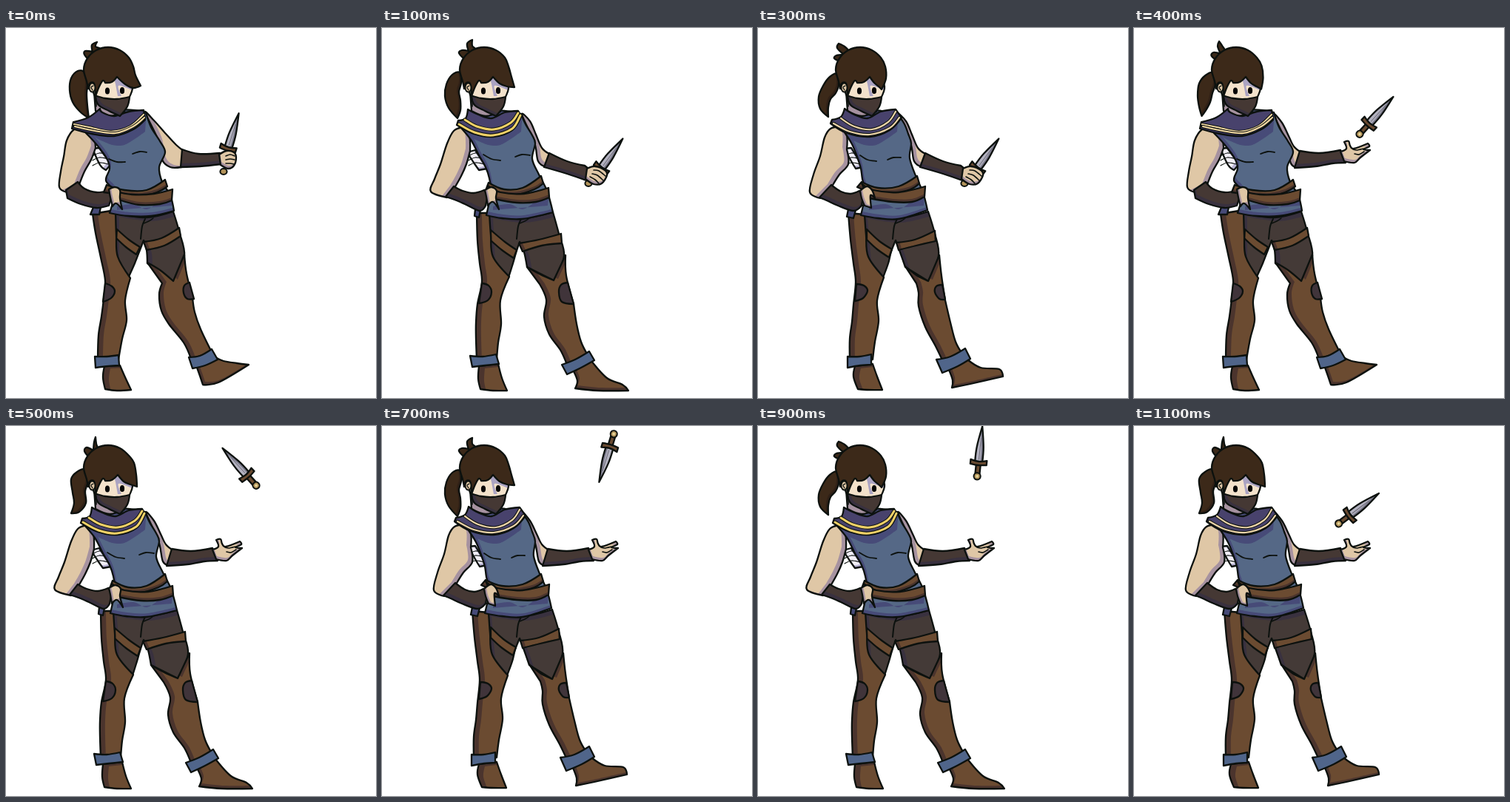
These frames come from a looping animation (500 by 500 pixels, 1200 ms). An HTML page with a canvas:

```html
<!DOCTYPE html>
<html lang="en">
<head>
<meta charset="utf-8">
<title>Dagger toss</title>
<style>
  html, body { margin: 0; width: 100%; height: 100%; overflow: hidden; background: #fff; }
  canvas { display: block; width: 500px; height: 500px; }
</style>
</head>
<body>
<canvas id="stage" width="500" height="500"></canvas>
<script>
const ctx = document.getElementById('stage').getContext('2d');
const STEP = 100, STEPS = 12;
const INK = '#0c110e', SKIN = '#dfc7a6', SKIN_DARK = '#a692a0', HAIR = '#3c2919';
const LEATHER = '#6b4b31', LEATHER_DARK = '#4b342d', CLOTH = '#443a37', CLOTH_DARK = '#39313f';
const BLUE = '#556886', BLUE_DARK = '#474b78', PURPLE = '#48426c', GLOVE = '#453834';

// "x y, x y*, ..." : a star marks a sharp corner
const parse = text => text.split(',').map(p => {
  const [x, y] = p.trim().split(' ').map(parseFloat);
  return { x, y, sharp: p.includes('*') };
});

// Picks a shape from a list; a fractional key blends two neighbours
function at(list, key) {
  const a = parse(list[Math.floor(key)]), k = key % 1;
  if (!k) return a;
  const b = parse(list[Math.ceil(key)]);
  return a.map((p, i) => ({ x: p.x + (b[i].x - p.x) * k, y: p.y + (b[i].y - p.y) * k, sharp: p.sharp }));
}

function outline(points, closed = true) {
  const path = new Path2D(), n = points.length;
  const get = i => closed ? points[(i + n) % n] : points[Math.max(0, Math.min(n - 1, i))];
  const slope = i => {
    if (get(i).sharp) return [0, 0];
    const a = get(i - 1), b = get(i + 1);
    return [(b.x - a.x) / 6, (b.y - a.y) / 6];
  };
  path.moveTo(points[0].x, points[0].y);
  for (let i = 0; i < (closed ? n : n - 1); i++) {
    const p = get(i), q = get(i + 1), s = slope(i), e = slope(i + 1);
    path.bezierCurveTo(p.x + s[0], p.y + s[1], q.x - e[0], q.y - e[1], q.x, q.y);
  }
  if (closed) path.closePath();
  return path;
}

// Fills a shape; when shaded, the lit copy is shifted inside the dark one
function shape(points, fill, dark, dx = 0, dy = 0, extra) {
  const path = outline(points);
  ctx.fillStyle = dark || fill;
  ctx.fill(path);
  ctx.save();
  ctx.clip(path);
  if (dark) {
    ctx.translate(dx, dy);
    ctx.fillStyle = fill;
    ctx.fill(path);
    ctx.translate(-dx, -dy);
  }
  if (extra) extra();
  ctx.restore();
  ink(path);
}
function ink(path, width = 2.3, color = INK) {
  ctx.strokeStyle = color;
  ctx.lineWidth = width;
  ctx.stroke(path);
}
const line = (text, width, color) => ink(outline(parse(text), false), width, color);
function patch(text, fill) {
  ctx.fillStyle = fill;
  ctx.fill(outline(parse(text)));
}
function oval(x, y, rx, ry, fill, width) {
  const path = new Path2D();
  path.ellipse(x, y, rx, ry, 0, 0, 7);
  ctx.fillStyle = fill;
  ctx.fill(path);
  if (width) ink(path, width);
}

// Three poses each: toe raised, toe down, toe rising
const body = {
  trousers: [
    '146 250*,190 256,226 248*,234 275,241 308,226 342*,191 318*,190 300,186 287*,181 300,174 318,165 338*,146 310*',
    '143 252*,186 258,231 249*,239 278,246 308,232 341*,196 323*,192 303,186 289*,181 304,177 318,171 337*,146 310*',
    '141 252*,186 258,230 248*,239 278,244 308,230 342*,199 323*,192 303,186 287*,180 302,176 318,169 337*,146 310*'],
  strapL: [
    '150 272*,166 286,181 296*,176 306*,162 296,149 284*',
    '147 273*,166 289,182 300*,178 311*,162 300,147 287*',
    '147 272*,164 288,181 299*,177 310*,161 299,147 286*'],
  strapR: [
    '186 289*,210 284,234 270*,236 281*,214 294,190 300*',
    '185 291*,212 286,242 278*,243 291*,216 294,190 302*',
    '187 290*,212 286,239 274*,240 288*,214 294,190 300*'],
  legL: [
    '117 251*,121 277,128 310,134 341,132 366,129 390,125 415,124 448*,152 448*,157 420,163 395,161 368,168 338*,151 309,149 280,148 246*',
    '128 250*,129 287,132 318,135 343,129 373,127 398,127 420,128 448*,155 448*,157 425,161 400,160 368,172 336*,150 309,147 280,145 250*',
    '122 250*,125 286,129 318,132 343,129 374,127 397,124 420,124 448*,155 448*,158 424,163 396,161 368,170 337*,149 309,146 280,144 252*'],
  kneeL: [
    '134 345*,143 349,147 356,142 365,131 370*',
    '135 345*,144 348,148 357,143 368,131 372*',
    '133 346*,143 348,148 355,142 365,131 369*'],
  bootR: [
    '191 317*,208 327,226 342*,241 306*,244 332,252 364*,255 384,263 407,278 438*,250 447*,240 425,220 400,210 382,207 360,211 345*',
    '196 323*,214 333,232 341*,248 307*,249 335,259 373*,263 400,269 424,278 442*,250 455*,241 435,226 414,219 390,222 367,213 346*',
    '199 322*,214 334,230 342*,245 307*,248 335,253 368*,260 398,267 424,276 440*,251 453*,240 430,226 404,217 376,217 358,214 345*'],
  kneeR: [
    '248 344*,241 348,240 358,245 366,254 366*',
    '251 344*,242 347,239 357,243 370,259 373*',
    '249 347*,241 349,239 357,245 366,253 367*'],
  footL: [
    '133 457*,131 472,134 488*,150 490,169 489*,161 472,154 456*',
    '131 457*,130 474,133 488*,150 490,169 490*,162 473,157 454*',
    '131 457*,129 471,135 488*,150 489,168 489*,161 471,155 454*'],
  footR: [
    '257 456*,262 470,266 482*,287 479,328 455*,312 453,294 450,283 445*',
    '259 464*,264 477,261 487*,292 490,333 490*,325 482,304 473,283 450*',
    '258 462*,263 476,262 486*,287 481,331 471*,326 461,301 459,283 448*'],
  cuffL: [
    '120 444*,136 444,152 442*,153 456*,138 457,121 459*',
    '119 443*,136 444,154 441*,158 454*,139 456,122 458*',
    '121 444*,137 444,153 441*,153 455*,138 456,121 459*'],
  cuffR: [
    '247 445*,262 443,278 434*,286 448*,269 456,252 460*',
    '243 455*,261 448,280 437*,287 449*,269 459,250 468*',
    '241 448*,260 444,280 433*,287 447*,270 457,249 466*'],
  armL: [
    '106 133*,92 137,82 152,78 174,74 194,72 215,82 222*,98 214*,106 194,115 178,121 162*,118 145',
    '110 134*,97 139,88 156,79 184,71 204,66 221,88 229*,98 216*,107 200,114 184,119 166*,118 145',
    '112 133*,98 136,90 148,84 173,75 198,70 222,84 230*,100 214*,110 198,122 184,120 164*,120 145'],
  wrap: [
    '117 163*,126 162*,142 184*,135 192*,127 185',
    '115 168*,126 165*,142 190*,131 192*,124 182',
    '117 163*,126 162*,142 188*,132 190*,126 180'],
  tunic: [
    '108 142*,122 157,136 176,140 190,135 206,146 222,140 250*,165 254,196 254,227 247*,222 226,211 208,207 188,215 168,208 153,196 134,189 114*,150 112',
    '105 133*,120 151,131 172,140 188,145 203,147 222,141 253*,162 257,190 258,231 249*,223 220,212 198,203 177,207 156,203 145,194 130,188 116*,150 112',
    '117 141*,127 157,134 174,139 190,141 204,145 222,139 253*,162 257,190 258,229 246*,223 222,214 202,205 176,207 156,203 143,198 130,190 118*,150 112'],
  flap: [
    '119 240*,114 252*,126 252*,128 242*', '126 245*,125 254*,131 256*,133 246*', '122 245*,120 255*,129 257*,132 246*'],
  gloveL: [
    '81 219*,83 230*,101 238,122 243,139 240*,143 228*,138 220*,122 222,106 217,97 208*',
    '86 228*,98 232,112 238,132 247,140 240*,143 226*,138 219*,124 223,109 220,97 214*',
    '83 229*,95 234,108 240,129 247,140 240*,142 228*,137 220*,125 224,112 221,99 212*'],
  beltTop: [
    '132 222*,136 212*,160 219,190 219,215 205*,218 214*,204 222,180 227,155 225*',
    '141 217*,144 209*,165 218,190 216,215 200*,218 210*,206 218,182 225,155 224*',
    '134 215*,140 208*,162 216,190 214,215 200*,218 210*,206 218,182 223,152 223*'],
  beltLow: [
    '148 221*,170 225,200 224,225 218*,224 233*,208 238,180 239,152 232*',
    '143 213*,160 222,192 224,225 216*,226 229*,208 235,182 236,152 231*',
    '140 210*,156 219,190 222,226 214*,225 228*,208 235,182 235,150 230*'],
  handL: [
    '139 218*,147 215,154 219,154 230,157 245*,149 237,144 241*,141 229',
    '139 219*,148 215,155 220,154 230,158 245*,150 235,143 240*,141 228',
    '138 220*,147 214,154 219,158 230*,152 226,153 243*,144 240*,140 230'],
  scarf: [
    '127 109*,111 121,91 127*,89 136*,116 143,146 146,172 137,188 124*,186 111*,166 113,146 119,130 114',
    '116 110*,113 122,103 125*,101 131*,124 143,150 147,176 138,188 119*,184 112*,166 114,148 122,130 117',
    '117 109*,112 120,100 124*,98 129*,120 142,151 147,178 138,194 121*,186 110*,166 113,148 122,130 117']
};
const trims = [
  ['92 130,112 134,142 140,168 133,186 117', '93 133,120 139,148 142,172 133,187 121'],
  ['112 124,128 133,151 137,174 128,184 115', '104 130,125 141,150 145,176 136,187 118'],
  ['112 122,130 133,154 137,176 127,186 113', '102 129,124 140,151 144,178 135,191 121']
];

// Hair swing
const tails = [
  '106 60,97 58,88 68,86 84,90 100,100 113,112 122*,110 105,109 89,110 74',
  '105 60,95 63,87 76,85 92,90 108,102 122*,106 111,106 98,104 86,107 74',
  '107 62,97 66,88 78,82 93,84 109,95 120*,95 107,98 96,105 88,109 77',
  '107 59,96 62,88 72,90 90,92 104,88 118*,99 116,108 104,107 88,111 74'
];
const fringes = [
  '172 52,175 64,182 78*,172 81,161 76,150 66*',
  '171 52,175 66,179 80*,169 79,159 75,150 66*',
  '172 52,173 68,167 83*,163 79,157 74,151 66*',
  '173 50,176 66,177 82*,168 79,159 75,151 66*'
].map(f => '109 72,105 56,110 41,122 30,138 26,154 30,166 40,' + f +
  ',143 73,134 74*,131 71,126 79,121 92*,119 75,113 75,111 82*');
const tufts = [
  '114 42,106 36,107 31,117 32*,116 23,123 19*,121 25,127 29',
  '114 42,104 34,108 30,117 31*,115 21,122 16*,122 24,126 30',
  '112 44,103 41,106 37,116 36*,107 27,109 21*,117 25,122 32',
  '114 42,106 34,109 29,118 33*,119 22,121 15*,122 24,124 33'
];

// Throwing arm
const arms = {
  raised: {
    skin: '188 114,200 125,216 143,230 158,240 166*,237 188*,222 188,211 178,205 150',
    glove: '238 164*,260 170,289 169*,291 184*,262 187,236 188*',
    hand: '288 171*,298 166,308 168,311 175,308 186,300 190,290 185*',
    fingers: ['297 173,303 171,309 173', '297 178,303 177,309 178', '297 183,303 183,308 184'],
    pommel: [294, 194]
  },
  low: {
    skin: '189 117,200 126,208 144,216 162,226 170*,222 188*,211 180,206 155',
    glove: '226 169*,250 180,274 186*,284 194*,276 206*,250 197,219 188*',
    hand: '277 190*,288 187,301 192,304 199,297 210,286 211,275 204*',
    fingers: ['286 192,293 193,302 200', '284 197,291 199,299 206', '281 201,288 205,293 210'],
    pommel: [279, 210]
  },
  open: {
    skin: '189 117,200 128,209 146,216 160,226 168*,221 188*,212 183,206 155',
    glove: '224 166*,250 169,279 165*,286 182*,268 183,245 187,217 189*',
    hand: '279 167*,287 163,284 154*,290 153,292 159,297 163,316 156*,318 160,310 164,319 165*,306 175,298 182,284 180*',
    fingers: ['296 164,301 165,310 163', '298 170,304 171,311 167']
  }
};

// Guard position and turn of the dagger at each step
const knife = [
  [300, 163, 17], [296, 190, 36], [296, 190, 36], [296, 190, 36], [317, 130, 42], [326, 67, -42],
  [328, 38, -103], [308, 28, -163], [286, 30, -258], [298, 50, -354], [303, 75, -500], [291, 121, -667]
];

function drawKnife([x, y, turn], held) {
  ctx.save();
  ctx.translate(x, y);
  ctx.rotate(turn * Math.PI / 180);
  if (!held) {
    shape(parse('-3 0*,3 0*,3 15*,-3 15*'), LEATHER);
    oval(0, 18, 4.6, 4.6, '#b3935a', 2);
    oval(0, 18, 1.8, 1.8, '#e6d69a');
  }
  shape(parse('-5 -2*,-4.5 -22,0 -50*,4.5 -22,5 -2*'), '#b3b2c0', '#7c7b8c', -3, 0);
  line('0 -5,0 -34', 1, '#6d6b78');
  shape(parse('-11 -4*,0 -2,11 -4*,11 2*,0 3,-11 2*'), LEATHER);
  ctx.restore();
}

function drawBody(key) {
  const pose = Math.round(key);
  const part = (name, ...look) => shape(at(body[name], key), ...look);
  part('trousers', CLOTH, CLOTH_DARK, 7, 5);
  line('188 258,184 268,182 285', 2);
  line('186 264,193 261,199 257', 1.5);
  part('strapL', LEATHER);
  part('strapR', LEATHER, LEATHER_DARK, 4, -2);
  part('legL', LEATHER, LEATHER_DARK, 7, 0);
  part('kneeL', '#40343a');
  part('bootR', LEATHER, LEATHER_DARK, 6, -2);
  part('kneeR', '#40343a');
  part('footL', LEATHER, LEATHER_DARK, 8, 3);
  part('footR', LEATHER, LEATHER_DARK, 3, -4);
  part('cuffL', '#50658a');
  part('cuffR', '#50658a');
  part('flap', BLUE_DARK);
  part('wrap', '#f1eef7', '#b7b2d2', -4, -3);
  for (const y of [171, 177, 184]) line(`117 ${y + 2},126 ${y - 2},138 ${y}`, 1.2);
  part('armL', SKIN, SKIN_DARK, -6, -3);
  part('tunic', BLUE, BLUE_DARK, 2, -5, () => {
    patch('108 136*,121 148,140 157*,160 158,188 140*,190 112*,140 112*', BLUE_DARK);
    patch('150 241*,172 238,190 245,205 236*,225 230*,224 240*,150 246*', BLUE_DARK);
  });
  line(['139 177,150 181,161 181', '137 171,148 177,160 179', '138 172,148 178,160 180'][pose], 1.8);
  line(['171 170,181 167,190 168', '180 174,189 171,200 172', '175 178,183 175,193 175'][pose], 1.8);
  part('gloveL', GLOVE, CLOTH_DARK, 2, -5);
  part('beltTop', LEATHER, LEATHER_DARK, 0, -4);
  part('beltLow', LEATHER, LEATHER_DARK, 0, -4);
  part('handL', SKIN, SKIN_DARK, 3, -2);
  shape(parse('119 86*,121 112*,140 119,160 113*,160 95*'), SKIN_DARK);
  part('scarf', PURPLE, '#353157', 0, -5);
  const gold = ['#efd6a2', '#f0d168', '#ead3a8'][pose];
  for (const t of trims[pose]) {
    line(t, pose === 1 ? 5 : 4.2);
    line(t, pose === 1 ? 3 : 2.2, gold);
  }
}

function drawHead(key) {
  shape(parse('118 72*,119 90,134 104,153 114,166 95,171 79,162 66,140 60'), '#f3e2cb', null, 0, 0, () => {
    patch('146 68*,148 76,151 92*,156 92*,152 78,170 84*,170 70*', '#aaa3c2');
  });
  oval(137, 85, 3.1, 4.6, '#050505');
  oval(157, 84.5, 3.1, 4.6, '#050505');
  shape(parse('120 91*,134 95,150 96,167 93*,164 106,154 119*,139 112,125 104'), GLOVE, CLOTH_DARK, 4, -3);
  shape(at(tufts, key), HAIR);
  shape(at(fringes, key), HAIR);
  oval(116.5, 80.5, 4, 6, SKIN, 1.9);
  line('118 78,115 80,117 84', 1.2);
  line('120 87,122 96,122 106', 1.6);
}

function drawStep(step) {
  const pose = [0, 1, 1.5, 2][step % 4];
  const hair = [0, 1, 1.5, 2, 2.5, 3][step % 6];
  const arm = step === 0 ? arms.raised : step < 4 ? arms.low : arms.open;
  ctx.fillStyle = '#fff';
  ctx.fillRect(0, 0, 500, 500);
  ctx.lineJoin = ctx.lineCap = 'round';
  shape(at(tails, hair), HAIR, '#302016', -3, -2);
  shape(parse(arm.skin), SKIN, SKIN_DARK, 5, -3);
  shape(parse(arm.glove), GLOVE, CLOTH_DARK, 0, -5);
  if (arm.pommel) oval(...arm.pommel, 4.6, 4, '#b3935a', 2);
  drawKnife(knife[step], !!arm.pommel);
  shape(parse(arm.hand), SKIN, SKIN_DARK, 1, -4);
  arm.fingers.forEach(f => line(f, 1.6));
  drawBody(pose);
  drawHead(hair);
}

let shown = -1;
function tick() {
  const step = Math.floor(performance.now() / STEP) % STEPS;
  if (step !== shown) drawStep(shown = step);
  requestAnimationFrame(tick);
}
tick();
</script>
</body>
</html>
```
